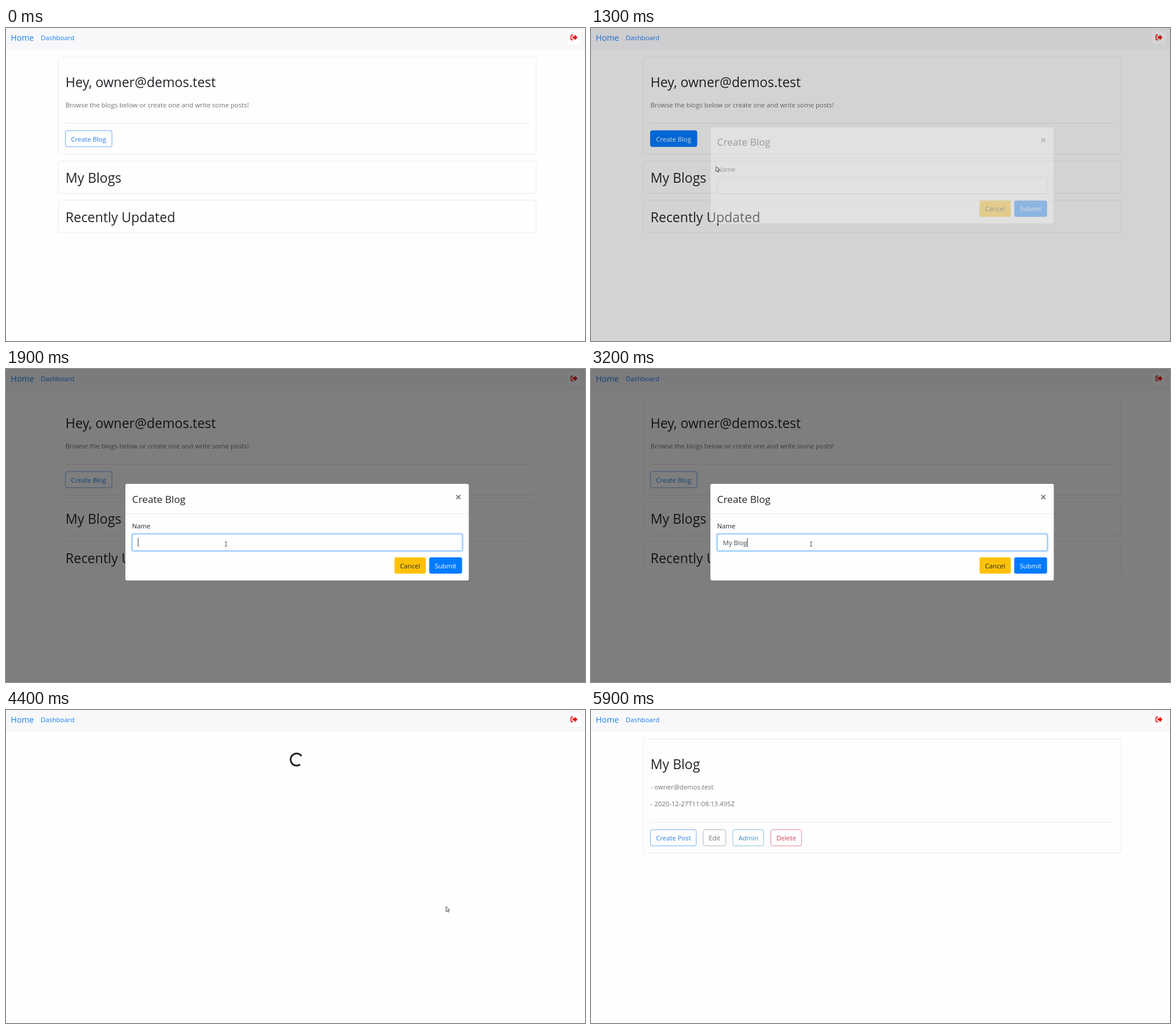
These frames come from a looping animation (1000x540 px, 6 s). An HTML page:

```html
<!DOCTYPE html>
<html lang="en">
<head>
<meta charset="utf-8">
<title>Create a blog</title>
<style>
  html, body { margin: 0; width: 100%; height: 100%; overflow: hidden; background: #fefefe; }
  svg { display: block; width: 1000px; height: 540px; }
  text { font: 400 11.3px "Open Sans", "Noto Sans", sans-serif; fill: #212529; white-space: pre; }
  .brand { font-size: 14.1px; }
  .link { fill: #1a80f0; }
  .h2 { font-size: 23px; font-weight: 500; }
  .h4 { font-size: 17.2px; font-weight: 500; }
  .muted { fill: #6c757d; }
  .card { fill: #fefefe; stroke: #ececec; }
  .rule { stroke: #e8e8e8; }
</style>
</head>
<body>
<svg id="stage" viewBox="0 0 1000 540"></svg>
<script>
const LOOP = 6000, STEP = 100;
const EMAIL = "owner@demos.test";
const BLOG = "My Blog";
const OPEN = 1250, FOCUS = 1700, TYPE = 2500, LOAD = 4380, READY = 4700;

// time, x, y
const CURSOR_PATH = [
  [300, 490, 440], [900, 156, 188], [1200, 156, 188], [1300, 216, 239],
  [1600, 380, 302], [3500, 380, 302], [4200, 760, 339], [4500, 760, 339], [4900, 500, 464]
];

const text = (x, y, str, cls = "", extra = "") =>
  `<text x="${x}" y="${y}" class="${cls}" ${extra}>${str}</text>`;
const box = (x, y, w, h, attrs) =>
  `<rect x="${x}" y="${y}" width="${w}" height="${h}" rx="3" ${attrs}/>`;
const card = (y, h) => box(90.5, y, 825, h, 'class="card"');
const rule = (x1, x2, y) => `<path class="rule" d="M${x1} ${y}H${x2}"/>`;
const outlineButton = (x, y, w, label, edge, ink, id) =>
  box(x, y, w, 27.8, `fill="#007bff" fill-opacity="0" stroke="${edge}" stroke-width=".85" id="${id}Box"`) +
  text(x + 9.7, y + 18.8, label, "", `style="fill:${ink}" id="${id}Label"`);

const navbar = `
  <rect width="1000" height="38" fill="#f8f8fa"/>
  ${text(8.3, 22, "Home", "link brand")}
  ${text(60, 21.2, "Dashboard", "link")}
  ${box(968.5, 3.5, 25.5, 26, 'fill="#fefefe" stroke="#f0f0f1"')}
  <path d="M979.3 12.1h-1.9a1.7 1.7 0 0 0-1.7 1.7v4.9a1.7 1.7 0 0 0 1.7 1.7h1.9" fill="none" stroke="#ee0a0a" stroke-width="1.6"/>
  <path d="M978.5 14.3h3.6v-2.9l5 4.9-5 4.9v-2.9h-3.6z" fill="#ee0a0a"/>`;

const homePage = `<g id="home">
  ${card(50.5, 167)}
  ${text(102.8, 102.2, "Hey, " + EMAIL, "h2")}
  ${text(102.8, 137, "Browse the blogs below or create one and write some posts!", "muted")}
  ${rule(103, 903, 164.5)}
  ${outlineButton(102.6, 177, 80.4, "Create Blog", "#5a9df0", "#2a7fe6", "create")}
  ${card(229.5, 56)}
  ${text(102.8, 267.2, "My Blogs", "h2")}
  ${card(297, 56)}
  ${text(102.8, 334.8, "Recently Updated", "h2")}
</g>`;

const loader = `<g id="loader">
  <path id="spinner" d="M7.35 7.35A10.4 10.4 0 1 1 7.35 -7.35" fill="none" stroke="#212529" stroke-width="3"/>
</g>`;

const blogPage = `<g id="blog">
  ${card(50.5, 196)}
  ${text(102.8, 102.2, BLOG, "h2")}
  ${text(102.8, 137, "- " + EMAIL, "muted")}
  ${text(102.8, 166, "- 2020-12-27T11:08:13.495Z", "muted")}
  ${rule(103, 903, 194)}
  ${outlineButton(102.6, 206.6, 79.2, "Create Post", "#5a9df0", "#2a7fe6", "post")}
  ${outlineButton(193.6, 206.6, 39.3, "Edit", "#a2a6aa", "#6c757d", "edit")}
  ${outlineButton(245, 206.6, 53.2, "Admin", "#6fb4d2", "#3f8ac4", "admin")}
  ${outlineButton(310.5, 206.6, 53.2, "Delete", "#de7482", "#d2404f", "delete")}
</g>`;

const modal = `
<rect id="backdrop" width="1000" height="540"/>
<g id="modal">
  ${box(206, 198, 593.5, 167, 'fill="#fefefe" stroke="#000" stroke-opacity=".2" stroke-width=".7"')}
  ${text(217.8, 230.8, "Create Blog", "h4")}
  <path d="M777.7 217.5l7 7m0-7l-7 7" stroke="#7c7c7c" stroke-width="1.9"/>
  ${rule(206.5, 799, 249.5)}
  ${text(217.8, 275.2, "Name")}
  ${box(217, 284, 572, 30.5, 'id="ring" fill="none" stroke="#007bff" stroke-opacity=".25" stroke-width="2.4"')}
  ${box(218.2, 285, 569.6, 28.5, 'id="field" fill="#fefefe"')}
  ${text(227.7, 303.8, "", "", 'id="typed" style="fill:#495057"')}
  <path id="caret" d="M0 291.5v15" stroke="#333"/>
  ${box(671, 325, 54, 28, 'fill="#ffc107"')}
  ${text(680.4, 343.6, "Cancel")}
  ${box(731, 325, 56.7, 28, 'id="submit"')}
  ${text(740.4, 343.6, "Submit", "", 'style="fill:#fff"')}
</g>`;

const cursor = `<g id="cursor">
  <path id="arrow" d="M0 0v8.6l2-1.8 1.4 3 1.5-.7-1.4-2.8h2.5z" fill="#fff" stroke="#333" stroke-width=".9"/>
  <path id="beam" d="M-2 -3.7h4m-2 0v7.4m-2 0h4" fill="none" stroke="#555" stroke-width=".9"/>
</g>`;

document.getElementById("stage").innerHTML =
  navbar + homePage + loader + blogPage + modal + cursor;

const parts = {};
document.querySelectorAll("#stage [id]").forEach(el => parts[el.id] = el);

const clamp = v => Math.max(0, Math.min(1, v));
const smooth = v => v * v * (3 - 2 * v);
const show = (id, on) => parts[id].setAttribute("display", on ? "inline" : "none");
const set = (id, attrs) => {
  for (const key in attrs) parts[id].setAttribute(key, attrs[key]);
};

// cubic-bezier(0, 0, .58, 1), solved by bisection
function easeOut(p) {
  let lo = 0, hi = 1;
  for (let i = 0; i < 20; i++) {
    const s = (lo + hi) / 2;
    const x = 3 * .58 * (1 - s) * s * s + s ** 3;
    if (x < p) lo = s; else hi = s;
  }
  return smooth(lo);
}

function cursorAt(t) {
  const next = CURSOR_PATH.findIndex(key => key[0] > t);
  if (next < 0) return CURSOR_PATH[CURSOR_PATH.length - 1].slice(1);
  if (next === 0) return CURSOR_PATH[0].slice(1);
  const [t0, x0, y0] = CURSOR_PATH[next - 1];
  const [t1, x1, y1] = CURSOR_PATH[next];
  const k = smooth((t - t0) / (t1 - t0));
  return [x0 + (x1 - x0) * k, y0 + (y1 - y0) * k];
}

function caretOn(t) {
  if (t < FOCUS) return false;
  if (t < TYPE) return (t - FOCUS) % 1060 < 530;
  return t < 3200 || (t - 3100) % 1060 < 530;
}

function draw(t) {
  const [x, y] = cursorAt(t);
  const inside = (l, top, r, b) => x >= l && x <= r && y >= top && y <= b;
  const modalOpen = t >= OPEN && t < LOAD;

  show("home", t < LOAD);
  show("loader", t >= LOAD && t < READY);
  show("blog", t >= READY);
  show("backdrop", modalOpen);
  show("modal", modalOpen);

  const hot = t < 1400 && t >= 300 && (t >= OPEN || inside(102, 177, 183, 205));
  set("createBox", { "fill-opacity": hot ? 1 : 0, stroke: hot ? "#007bff" : "#5a9df0" });
  parts.createLabel.style.fill = hot ? "#fff" : "#2a7fe6";

  const fade = clamp((t - OPEN) / 150);
  const drop = -37 * (1 - easeOut(clamp((t - OPEN) / 300)));
  set("backdrop", { opacity: fade / 2 });
  set("modal", { opacity: fade, transform: `translate(0 ${drop})` });

  const focused = t >= FOCUS;
  show("ring", focused);
  set("field", { stroke: focused ? "#80bdff" : "#ced4da" });
  set("submit", { fill: t > 3600 && inside(731, 325, 788, 353) ? "#0069d9" : "#007bff" });

  const typed = BLOG.slice(0, Math.max(0, Math.floor((t - TYPE) / STEP) + 1));
  parts.typed.textContent = typed;
  if (modalOpen) {
    const width = typed ? parts.typed.getComputedTextLength() : 0;
    set("caret", { transform: `translate(${228.2 + width} 0)` });
  }
  show("caret", caretOn(t));

  set("spinner", { transform: `translate(502 85.5) rotate(${(t - LOAD) / 750 * 360})` });

  const overField = modalOpen && t >= 1500 && inside(218, 285, 788, 314);
  show("cursor", t >= 300 && t < 5000);
  show("arrow", !overField);
  show("beam", overField);
  set("cursor", { transform: `translate(${x} ${y})` });
}

const start = performance.now();
function tick() {
  const t = (performance.now() - start) % LOOP;
  draw(Math.floor(t / STEP) * STEP);
  requestAnimationFrame(tick);
}
tick();
</script>
</body>
</html>
```
